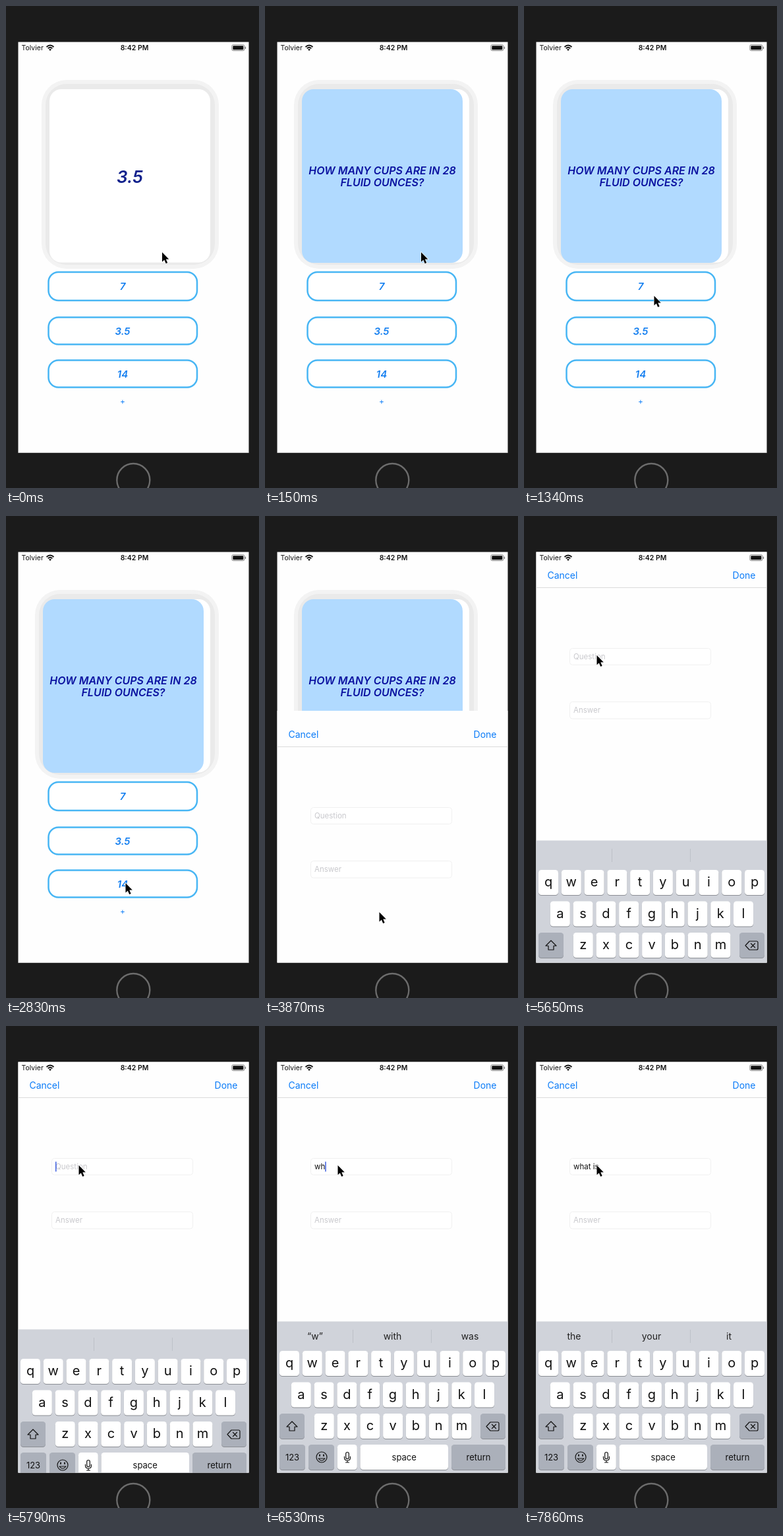
These frames come from a looping animation (384 by 730 pixels, 8 s). An HTML page:

```html
<!DOCTYPE html>
<html lang="en">
<head>
<meta charset="utf-8">
<title>Flashcards</title>
<style>
  html, body { margin: 0; height: 100%; overflow: hidden; background: #1b1b1b; }
  svg { display: block; width: 100vw; height: 100vh; font-family: Inter, Roboto, sans-serif; }
  text { white-space: pre; }
  .mid { text-anchor: middle; }
  .blue { fill: #0b7cf8; }
  .hand { font-style: italic; font-weight: 600; text-anchor: middle; }
  .choice rect { fill: #fff; stroke: #48b6f4; stroke-width: 2.5; }
  .choice text { font-size: 15px; fill: #147ff0; }
  .field { fill: #fff; stroke: #f0f0f0; }
  .hint { fill: #c9c9cd; }
  .entry { font-size: 11.5px; }
  .icon { fill: none; stroke: #111; stroke-width: 1.2; stroke-linejoin: round; stroke-linecap: round; }
</style>
</head>
<body>
<svg viewBox="0 0 384 730" preserveAspectRatio="none">
  <defs><clipPath id="screen"><rect x="18.5" y="54.5" width="350" height="622"/></clipPath></defs>
  <rect width="384" height="730" fill="#1b1b1b"/>
  <circle cx="193.3" cy="718" r="25" fill="none" stroke="#6c6c6c" stroke-width="2.4"/>
  <rect x="18.5" y="54.5" width="350" height="622" fill="#fefefe"/>

  <g clip-path="url(#screen)">
    <g id="rings"></g>
    <rect x="66" y="126" width="244" height="262.500" rx="18" fill="#fff"/>
    <text id="answer" class="hand" x="188" y="267.500" font-size="26" fill="#10218c">3.5</text>
    <g id="question">
      <rect x="56" y="126" width="244" height="263" rx="18" fill="#b1daff"/>
      <g class="hand" font-size="16" fill="#0b12a0">
        <text x="178" y="255">HOW MANY CUPS ARE IN 28</text>
        <text x="178" y="273">FLUID OUNCES?</text>
      </g>
    </g>
    <g class="choice">
      <rect x="64.500" y="403" width="225.500" height="43" rx="15"/><text class="hand" x="177" y="430">7</text>
      <rect x="64.500" y="471.500" width="225.500" height="41" rx="15"/><text class="hand" x="177" y="497.500">3.5</text>
      <rect x="64.500" y="536.500" width="225.500" height="41" rx="15"/><text class="hand" x="177" y="563">14</text>
    </g>
    <text id="plus" class="mid blue" x="177" y="603" font-size="12">+</text>

    <g id="sheet">
      <rect x="18" y="54" width="351" height="624" fill="#fefefe"/>
      <path d="M18 108.500H369" stroke="#dcdcdc"/>
      <g class="blue" font-size="14"><text x="35.500" y="95">Cancel</text><text x="351.500" y="95" text-anchor="end">Done</text></g>
      <rect class="field" x="69.500" y="200.500" width="214" height="25" rx="4"/>
      <rect class="field" x="69.500" y="281.500" width="214" height="25.500" rx="4"/>
      <text id="entry" class="entry" x="75" y="217"></text>
      <text class="entry hint" x="75" y="298">Answer</text>
      <rect id="caret" y="205.500" width="1.500" height="15" fill="#3d5fe0"/>
    </g>

    <g id="keyboard">
      <rect x="18" y="447.500" width="351" height="230" fill="#d0d3da"/>
      <path d="M133.500 460V480M252.500 460V480" stroke="#bdc1c8"/>
      <g id="hints" class="mid" font-size="14" fill="#222"></g>
      <g id="keys" class="mid" fill="#111"></g>
      <g class="icon">
        <path d="M41 599L49 607H45V613H37V607H33Z"/>
        <path d="M342 600H353Q355 600 355 602V611Q355 613 353 613H342L336 606.500ZM344.500 603.500L350.500 609.500M350.500 603.500L344.500 609.500"/>
        <circle cx="86" cy="653" r="8"/>
        <path d="M81 655Q86 661.500 91 655Z"/>
        <path d="M83 649.500V651M89 649.500V651" stroke-width="1.800"/>
        <rect x="122.700" y="645.500" width="4.600" height="10" rx="2.300"/>
        <path d="M120.500 652V654Q120.500 658 125 658T129.500 654V652M125 658V661M122.500 661H127.500"/>
      </g>
    </g>

    <g font-size="10.500" fill="#111">
      <text x="23.500" y="67">Tolvier</text>
      <text class="mid" x="195" y="67" font-weight="600">8:42 PM</text>
      <g fill="none" stroke="#111" stroke-width="1.900">
        <path d="M61.500 62Q67 57 72.500 62M63.700 64.300Q67 61.200 70.300 64.300"/>
      </g>
      <path d="M67 68L65 65.800Q67 64.300 69 65.800Z"/>
      <rect x="342.800" y="58.800" width="19" height="8.800" rx="2" fill="none" stroke="#777" stroke-width=".9"/>
      <rect x="344.300" y="60.200" width="16" height="6" rx=".8"/>
      <rect x="362.800" y="61.500" width="1.300" height="3.500" rx=".6" fill="#777"/>
    </g>
  </g>
  <path id="pointer" d="M0 0V14.500L3.300 11.400 5.700 17 8.200 16 5.800 10.400H10.300Z" stroke="#fff" stroke-width="1.200" paint-order="stroke"/>
</svg>
<script>
const LOOP = 8000, TICK = 148.2; // the picture is resampled once per tick
const $ = id => document.getElementById(id);

function add(parent, tag, attrs, text = '') {
  const node = document.createElementNS(parent.namespaceURI, tag);
  for (const name in attrs) node.setAttribute(name, attrs[name]);
  node.textContent = text;
  return parent.appendChild(node);
}

// Card rims: the second one belongs to the question card
const rim = (inset, fill, dx) => add($('rings'), 'rect', {
  x: 54 + inset + dx, y: 112 + inset, width: 269 - 2 * inset, height: 286 - 2 * inset, rx: 38 - inset, fill
});
const rims = [[0, '#f3f3f3'], [6, '#eaeaea']].map(([inset, fill]) => {
  rim(inset, fill, 0);
  return rim(inset, fill, -10);
});

function key(x, y, width, label = '', size = 20, fill = '#fff') {
  const box = { x, width, height: 38, rx: 4.5 };
  add($('keys'), 'rect', { ...box, y: y + 1, fill: '#8b8e94' });
  add($('keys'), 'rect', { ...box, y, fill });
  add($('keys'), 'text', { x: x + width / 2, y: y + (size > 15 ? 25 : 23.5), 'font-size': size }, label);
}
const letters = (row, x, y) => [...row].forEach((c, i) => key(x + i * 34.78, y, 30, c));
const GREY = '#abb0ba';
letters('qwertyuiop', 22, 492);
letters('asdfghjkl', 39.8, 539.5);
letters('zxcvbnm', 74.8, 587);
key(22, 587, 38, '', 20, GREY);
key(327, 587, 38, '', 20, GREY);
key(22, 634, 39, '123', 13, GREY);
key(66, 634, 39, '', 13, GREY);
key(109.800, 634, 30);
key(144.500, 634, 133.500, 'space', 13);
key(283, 634, 82, 'return', 13, GREY);

const hints = [76, 193.5, 311].map(x => add($('hints'), 'text', { x, y: 475 }));

// tick, x, y
const pointerPath = [
  [4, 237, 373], [6, 226, 391], [9, 197.5, 439], [10, 194, 471], [11, 205, 445], [12, 213, 424],
  [14, 211, 424], [15, 211, 426], [18, 190, 510], [20, 173, 602], [21, 173.5, 600], [28, 173.5, 600],
  [30, 137, 507], [32, 93, 225], [33, 95.5, 208], [36, 95.5, 208], [37, 110.5, 211]
];
// tick, typed text, suggestions
const typing = [
  [0, '', ''], [43, 'w', ''], [44, 'wh', '“w” with was'], [45, 'wha', '“w” with was'], [46, 'what', '“w” with was'],
  [47, 'what ', 'is the are'], [49, 'what i', 'is in it'], [51, 'what is', 'is in it'], [53, 'what is ', 'the your it']
];

function pointerAt(tick) {
  const next = pointerPath.findIndex(p => p[0] > tick);
  if (next === 0) return pointerPath[0].slice(1);
  if (next < 0) return pointerPath.at(-1).slice(1);
  const [a, b] = [pointerPath[next - 1], pointerPath[next]];
  const k = (tick - a[0]) / (b[0] - a[0]);
  return [a[1] + (b[1] - a[1]) * k, a[2] + (b[2] - a[2]) * k];
}

// Distance still to travel for a critically damped slide
function slide(tick, start, distance) {
  const x = Math.max(0, tick * TICK - start) * 0.0108;
  return Math.round(distance * (1 + x) * Math.exp(-x));
}

const show = (node, on) => node.setAttribute('visibility', on ? 'visible' : 'hidden');
const move = (node, x, y) => node.setAttribute('transform', `translate(${x} ${y})`);

function draw(tick) {
  const asked = tick >= 1;
  show($('question'), asked);
  show($('answer'), !asked);
  rims.forEach(r => show(r, asked));
  $('plus').setAttribute('opacity', tick === 23 || tick === 24 ? 0.3 : 1);
  move($('sheet'), 0, slide(tick, 3661.5, 622));
  move($('keyboard'), 0, slide(tick, 5348.6, 230));
  move($('pointer'), ...pointerAt(tick));

  const [, typed, words] = typing.findLast(t => t[0] <= tick);
  const entry = $('entry');
  entry.textContent = typed || 'Question';
  entry.setAttribute('fill', typed ? '#111' : '#c9c9cd');
  $('caret').setAttribute('x', 75 + (typed ? entry.getComputedTextLength() : 0));
  show($('caret'), tick >= 39 && tick < 53);
  hints.forEach((h, i) => h.textContent = words.split(' ')[i] || '');
}

function frame() {
  draw(Math.floor(performance.now() % LOOP / TICK));
  requestAnimationFrame(frame);
}
frame();
</script>
</body>
</html>
```
